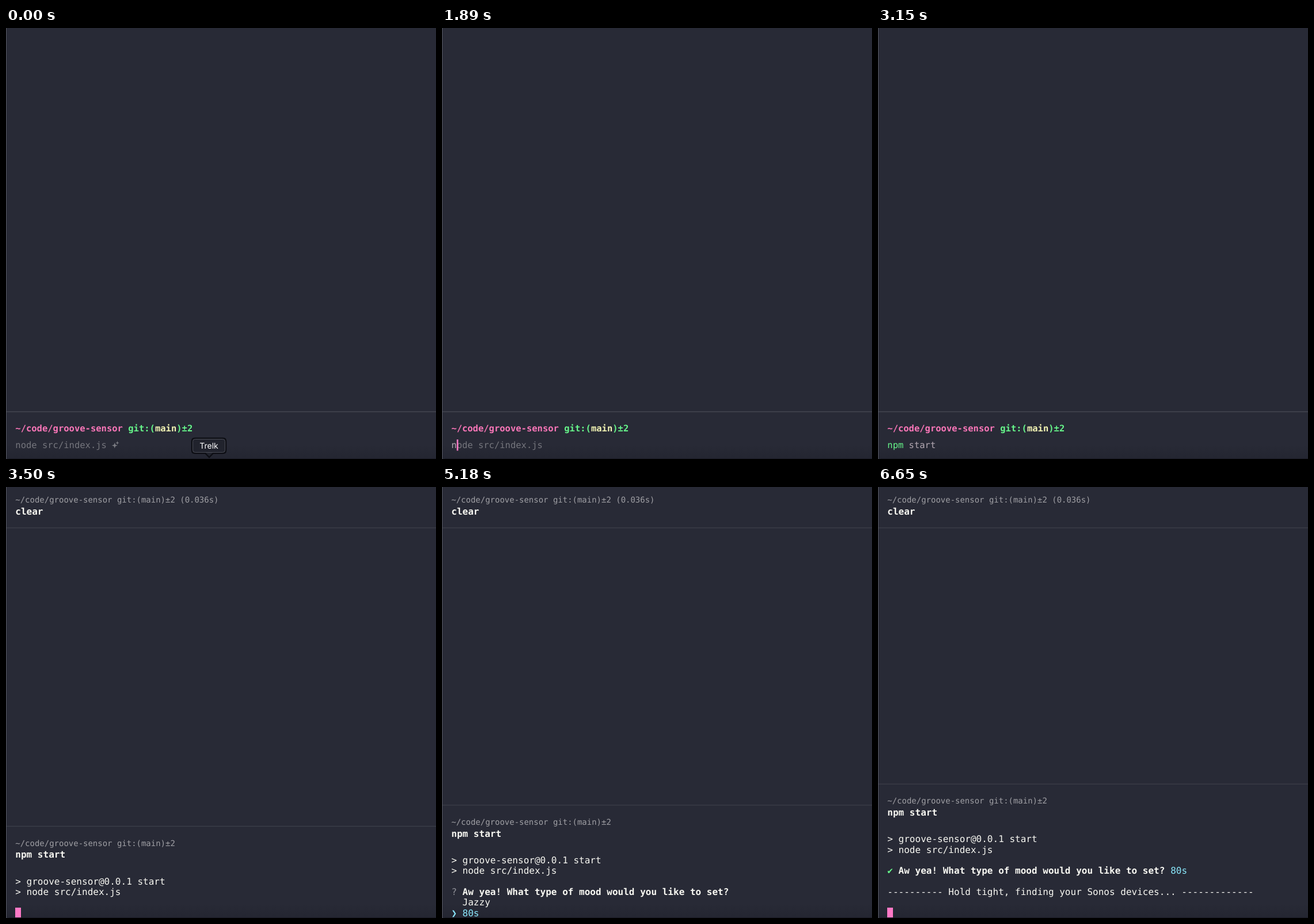
Write an HTML page that moves like this. It is 747 by 749 pixels and loops after 8 s.

```html
<!DOCTYPE html>
<html lang="en">
<head>
<meta charset="utf-8">
<title>Terminal session</title>
<style>
  html, body { margin: 0; width: 100%; height: 100%; overflow: hidden; background: #282a36; }
  svg { display: block; width: 100%; height: 100%; }
  text { white-space: pre; font-family: "DejaVu Sans Mono", monospace; text-rendering: geometricPrecision; }
  .tip text { font-family: Inter, sans-serif; }
</style>
</head>
<body>
<svg viewBox="0 0 747 749">
  <defs>
    <linearGradient id="shade" x1="0" y1="0" x2="0" y2="1">
      <stop offset="0" stop-color="#1c1e28" stop-opacity="0"/>
      <stop offset="1" stop-color="#1c1e28" stop-opacity=".35"/>
    </linearGradient>
    <path id="bubble" d="M328 713H377Q382 713 382 718V734Q382 739 377 739H360L353 746L346 739H328Q323 739 323 734V718Q323 713 328 713Z"/>
  </defs>
  <rect width="747" height="749" fill="#282a36"/>
  <rect y="724" width="747" height="25" fill="url(#shade)"/>
  <g id="screen"></g>
  <rect width="1" height="749" fill="#555761"/>
  <rect x="4" y="748" width="743" height="1" fill="#1b1c26"/>
  <g id="tip" class="tip">
    <use href="#bubble" fill="#21232d" stroke="#0d0e14" stroke-width="2.4"/>
    <rect x="324.5" y="714.5" width="56" height="23" rx="4" fill="none" stroke="#4b4d57"/>
    <text x="352.5" y="731" font-size="14" fill="#fff" text-anchor="middle">Trelk</text>
  </g>
</svg>
<script>
const LOOP = 8000, LEFT = 16.3, ADVANCE = 0.602, ROW = 18.35;
const PROMPT_SIZE = 15.5, HEADER_SIZE = 13.98, OUTPUT_SIZE = 16.02;
const PINK = "#f976b8", CURSOR = "#ff79c6", GREEN = "#66f68a", YELLOW = "#f3f5b4", CYAN = "#8be9fd",
  WHITE = "#f8f8f2", TYPED = "#b3a8b2", HINT = "#75767d", GREY = "#a0a0a5", DIM = "#8f9097";
const PATH = "~/code/groove-sensor", GIT = " git:(main)±2";
const screen = document.getElementById("screen");
const tip = document.getElementById("tip");

const escape = s => s.replace(/&/g, "&amp;").replace(/</g, "&lt;").replace(/>/g, "&gt;");
const rect = (x, y, w, h, fill) => `<rect x="${x}" y="${y}" width="${w}" height="${h}" fill="${fill}"/>`;

// Each part is [text, colour, bold]; parts sit on the character grid.
function line(y, size, ...parts) {
  let col = 0;
  return parts.map(([str, fill, bold]) => {
    const x = LEFT + col * size * ADVANCE;
    col += str.length;
    return `<text x="${x}" y="${y}" font-size="${size}" fill="${fill}"${bold ? ' font-weight="700"' : ""}>${escape(str)}</text>`;
  }).join("");
}

function star(x, y, r) {
  const k = r * 0.24;
  return `M${x} ${y - r}L${x + k} ${y - k}L${x + r} ${y}L${x + k} ${y + k}L${x} ${y + r}` +
    `L${x - k} ${y + k}L${x - r} ${y}L${x - k} ${y - k}Z`;
}

function prompt({ typed = "", hint = "", caret = false, sparkle = false }) {
  const command = typed.slice(0, 3);
  const parts = [
    [command, command === "npm" ? GREEN : TYPED],
    [typed.slice(3), TYPED],
    [hint, HINT]
  ];
  return rect(1, 666, 746, 1.6, "#42444f") +
    line(701.3, PROMPT_SIZE, [PATH, PINK, 1], [" git:(", GREEN, 1], ["main", YELLOW, 1], [")±2", GREEN, 1]) +
    line(730, PROMPT_SIZE, ...parts) +
    (sparkle ? `<path d="${star(188.8, 725.5, 5)}${star(193.5, 721, 3.2)}" fill="#7d7e85"/>` : "") +
    (caret ? rect(LEFT + typed.length * PROMPT_SIZE * ADVANCE, 715, 2.6, 19.5, CURSOR) : "");
}

function block(top, command, time = "") {
  return rect(1, top - 0.5, 746, 1, "#42444e") +
    line(top + 34, HEADER_SIZE, [PATH + GIT + time, GREY]) +
    line(top + 54.8, OUTPUT_SIZE, [command, WHITE, 1]);
}

// The running block is anchored to the bottom and grows upward.
function session(rows, cursor) {
  const first = 740 - ROW * (rows.length - 1);
  return block(-7, "clear", " (0.036s)") + rect(1, 70.5, 746, 1, "#42444e") +
    block(first - 77, "npm start") +
    rows.map((parts, i) => line(first + i * ROW + 5.6, OUTPUT_SIZE, ...parts)).join("") +
    (cursor ? rect(16, 731, 10, 18, CURSOR) : "");
}

const question = "Aw yea! What type of mood would you like to set?";
const npmOutput = [[], [["> groove-sensor@0.0.1 start", WHITE]], [["> node src/index.js", WHITE]], []];
const choice = (label, on) => on ? [["❯ " + label, CYAN]] : [["  " + label, WHITE]];
const menu = (picked, note) => session([...npmOutput,
  [["? ", DIM], [question, WHITE, 1], [note, DIM]],
  choice("Jazzy", picked === 0), choice("80s", picked === 1)]);
const typing = (typed, full) => prompt({ typed, hint: full.slice(typed.length), caret: true });
const idle = caret => prompt({ hint: "node src/index.js", sparkle: true, caret });

const scenes = [
  [0, idle(false)],
  [980, idle(true)],
  [1470, idle(false)],
  [1820, typing("n", "node src/index.js")],
  [1960, typing("np", "npm run test")],
  [2100, typing("npm", "npm run test")],
  [2240, typing("npm ", "npm run test")],
  [2450, typing("npm s", "npm start")],
  [2590, typing("npm st", "npm start")],
  [2660, typing("npm sta", "npm start")],
  [2800, typing("npm star", "npm start")],
  [3010, typing("npm start", "npm start")],
  [3150, prompt({ typed: "npm start" })],
  [3220, session([])],
  [3430, session([...npmOutput, []], true)],
  [3850, menu(0, " (Use arrow keys)")],
  [5180, menu(1, "")],
  [6580, session([...npmOutput,
    [["✔ ", GREEN], [question, WHITE, 1], [" 80s", CYAN]], [],
    [["-".repeat(10) + " Hold tight, finding your Sonos devices... " + "-".repeat(13), WHITE]],
    [], []], true)]
];

let shown = -1;
function draw(t) {
  const index = scenes.findLastIndex(([start]) => start <= t);
  if (index !== shown) {
    screen.innerHTML = scenes[index][1];
    shown = index;
  }
  tip.setAttribute("opacity", t < 140 ? 1 : t < 210 ? 0.6 : t < 280 ? 0.25 : 0);
}

const origin = performance.now();
function tick() {
  draw((performance.now() - origin) % LOOP);
  requestAnimationFrame(tick);
}
tick();
</script>
</body>
</html>
```
